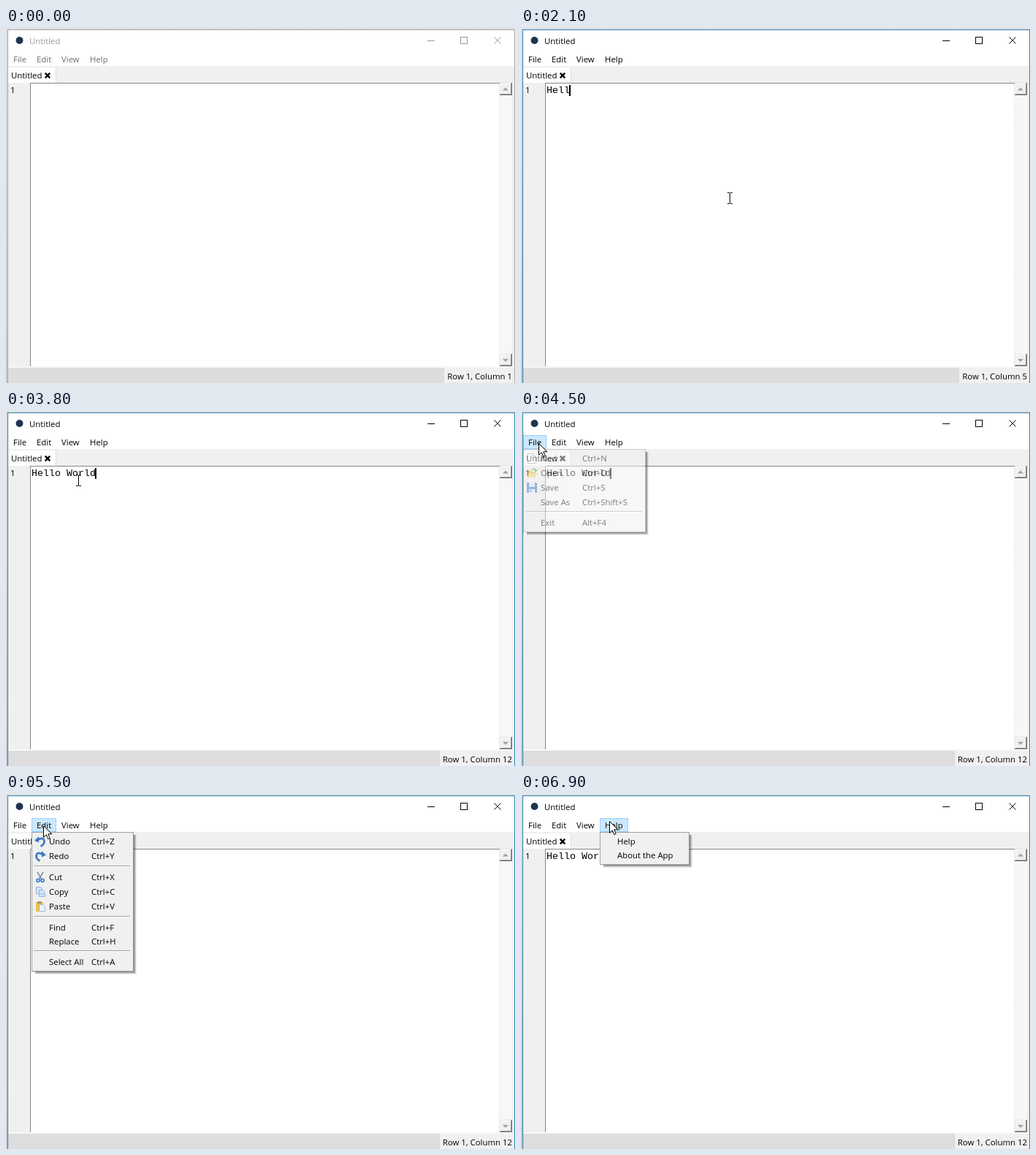
Animation, 698 px wide and 486 px high, one loop 7200 ms. Source, as an HTML page:

```html
<!DOCTYPE html>
<html lang="en">
<head>
<meta charset="utf-8">
<title>Text editor</title>
<style>
  html, body { margin: 0; width: 100%; height: 100%; overflow: hidden; background: #fff; }
  svg { display: block; width: 698px; height: 486px; }
  text { font: 11.4px "Open Sans", "Noto Sans", sans-serif; white-space: pre; }
  .code { font: 13.333px "Liberation Mono", "Courier New", monospace; }
  .crisp { shape-rendering: crispEdges; }
</style>
</head>
<body>
<svg id="stage" viewBox="0 0 698 486" xmlns="http://www.w3.org/2000/svg">
  <defs>
    <pattern id="track" width="2" height="2" patternUnits="userSpaceOnUse">
      <path d="M0 0h2v2h-2z" fill="#fdfdfd"/><path d="M0 0h1v1h-1zM1 1h1v1h-1z" fill="#f1f1f1"/>
    </pattern>
    <linearGradient id="edge" x2="0" y2="1">
      <stop stop-color="#dcdcde"/><stop offset="1" stop-color="#c3c3ca"/>
    </linearGradient>
  </defs>

  <!-- window -->
  <g class="crisp">
    <path d="M0 0h698v486h-698z" fill="url(#edge)"/>
    <path d="M3 3h694v49h-694z" fill="#fff"/>
    <path d="M3 52h694v434h-694z" fill="#f0f0f0"/>
    <path id="frame" d="M2.5 486V2.5H697.5V486" fill="none"/>
    <path d="M3 54h65v21h-65z" fill="#fff"/>
    <path d="M68.5 54V74" stroke="#dcdcdc"/>
    <path d="M33 75h643v388h-643z" fill="#fff"/>
    <path d="M33.5 463V75.5H677" fill="none" stroke="#868686"/>
    <path d="M677 75h17v388h-17z" fill="url(#track)"/>
    <path d="M3 463h694v2h-694z" fill="#f8f8f8"/>
    <path d="M3 465h694v21h-694z" fill="#dddddd"/>
    <path id="statusBox" fill="#f0f0f0"/>
  </g>
  <g id="scroll"></g>

  <circle cx="18.5" cy="17" r="5" fill="#1d3450"/>
  <text id="title" x="32" y="22">Untitled</text>
  <g id="buttons" fill="none">
    <path class="crisp" d="M578 17.5h10M623.5 12.5h9v9h-9z"/>
    <path d="M669.5 12.5l9 9M678.5 12.5l-9 9"/>
  </g>
  <rect id="hover" class="crisp" y="33.5" height="18" fill="#cce8ff" stroke="#99d1ff"/>
  <g id="bar"></g>

  <text x="7" y="69">Untitled</text>
  <path d="M53.7 61.7l6.6 6.6M60.3 61.7l-6.6 6.6" stroke="#000" stroke-width="2.4"/>
  <text x="6" y="89">1</text>
  <text id="typed" class="code" x="35" y="89"></text>
  <rect id="caret" class="crisp" y="78" height="15"/>
  <text id="status" x="694" y="481" text-anchor="end"></text>

  <g id="menus"></g>
  <path id="beam" class="crisp" d="M-3 -7.5h3M1 -7.5h3M.5 -7V7M-3 7.5h3M1 7.5h3" fill="none" stroke="#000"/>
  <path id="arrow" d="M.5 .5V16.3L4.2 12.8L6.8 18.6L9.2 17.5L6.7 11.8H11.8Z" fill="#fff" stroke="#000"/>
</svg>

<script>
const LOOP = 7200, STEP = 100;
const PHRASE = "Hello World";
const KEYS = [1500, 1700, 1900, 2100, 2300, 2500, 2600, 2700, 2900, 3100, 3300];
const FOCUS = 400, MENU_OPEN = 4400;
const CARET_OFF = [[0, FOCUS], [1000, 1300], [4000, 4300]];
const FADE = [0.25, 0.5, 0.75, 0.9];

// time, x, y of the pointer
const PATH = [
  [100, 640, 480], [400, 434, 348], [600, 434, 348], [1000, 286, 233],
  [3400, 286, 233], [3800, 99, 95], [3900, 99, 95], [4300, 24, 44],
  [4900, 24, 44], [5200, 51, 43], [5500, 51, 43], [5700, 86, 42],
  [6100, 86, 42], [6400, 118, 41], [6700, 120, 39], [6900, 121, 37]
];

const ICONS = {
  new: `<path d="M2.5 1.5h7l4 4v9h-11z" fill="#fff" stroke="#8a9bb0"/><path d="M9.5 1.5v4h4" fill="none" stroke="#8a9bb0"/>`,
  open: `<path d="M1 4h5l1 2h6v8H1z" fill="#e2b93f"/><path d="M3 8h12l-2 6H1z" fill="#f8d976"/><path d="M8 4q3-4 5 0" fill="none" stroke="#5ba043" stroke-width="1.6"/><path d="M11 3.5h4.5L13.2 7z" fill="#5ba043"/>`,
  save: `<path d="M1 1h13l1 1v13H1z" fill="#3d7cc9"/><path d="M4 1h8v6H4z" fill="#dbe8f6"/><path d="M4 10h8v5H4z" fill="#eef3f8"/><path d="M5.5 11h2v3h-2z" fill="#3d7cc9"/>`,
  undo: `<path d="M4 6Q13 1 13.5 8Q13.5 12 8.5 14.5" fill="none" stroke="#3f78c3" stroke-width="2.8"/><path d="M0 6.8L6 1V9.5z" fill="#3f78c3"/>`,
  cut: `<path d="M4 1l5.5 9M12 1L6.5 10" stroke="#7d92a8" stroke-width="1.6"/><g fill="none" stroke="#3b82cc" stroke-width="1.7"><circle cx="5" cy="12.3" r="2"/><circle cx="11" cy="12.3" r="2"/></g>`,
  copy: `<g fill="#d5e7f7" stroke="#8fb4d8"><path d="M2.5 1.5h6l2 2v7h-8z"/><path d="M6.5 5.5h5l3 3v6h-8z"/></g><path d="M8 10h5M8 12h5" stroke="#a9c7e4"/>`,
  paste: `<path d="M2 2h10v13H2z" fill="#f0c443"/><path d="M4.5 1h5v3h-5z" fill="#8d8d8d"/><path d="M6.5 5.5h5l3 3v6h-8z" fill="#e9f1fa" stroke="#9db8d4"/>`
};
ICONS.redo = `<g transform="matrix(-1 0 0 1 16 0)">${ICONS.undo}</g>`;

// rows: [baseline, label, shortcut, icon]
const MENUS = [
  { name: "File", tx: 10, bar: [3, 35], box: [3, 170, 165], label: 27, keys: 84, seps: [137], rows: [
    [69, "New", "Ctrl+N", "new"], [89, "Open", "Ctrl+O", "open"], [109, "Save", "Ctrl+S", "save"],
    [129, "Save As", "Ctrl+Shift+S"], [157, "Exit", "Alt+F4"]] },
  { name: "Edit", tx: 42, bar: [35, 69], box: [35, 174, 242], label: 59, keys: 117, seps: [98, 167, 214], rows: [
    [69, "Undo", "Ctrl+Z", "undo"], [89, "Redo", "Ctrl+Y", "redo"], [118, "Cut", "Ctrl+X", "cut"],
    [138, "Copy", "Ctrl+C", "copy"], [158, "Paste", "Ctrl+V", "paste"], [187, "Find", "Ctrl+F"],
    [206, "Replace", "Ctrl+H"], [234, "Select All", "Ctrl+A"]] },
  { name: "View", tx: 76, bar: [69, 108], box: [69, 242, 135], label: 93, seps: [], rows: [
    [69, "Show Line Numbers"], [89, "Show Status Bar"], [109, "Highlight Line"], [129, "Dark Theme"]] },
  { name: "Help", tx: 115, bar: [108, 147], box: [108, 230, 96], label: 132, seps: [], rows: [
    [69, "Help"], [88, "About the App"]] }
];

const $ = id => document.getElementById(id);
const put = (el, attrs) => { for (const k in attrs) el.setAttribute(k, attrs[k]); };
const show = (el, on) => { el.style.display = on ? "" : "none"; };
const label = (x, y, s) => `<text x="${x}" y="${y}">${s}</text>`;

function menuMarkup({ box: [l, r, b], label: lx, keys, seps, rows }) {
  const shadow = [0.45, 0.33, 0.2, 0.08].map((o, i) =>
    `<path d="M${r + i + 1.5} 56V${b + i + 1.5}H${l + 5}" fill="none" stroke="#000" stroke-opacity="${o}"/>`).join("");
  const lines = seps.map(y =>
    `<path class="crisp" d="M${l + 3} ${y}.5H${r - 4}" stroke="#a0a0a0"/><path class="crisp" d="M${l + 3} ${y + 1}.5H${r - 4}" stroke="#fff"/>`).join("");
  const items = rows.map(([y, name, key, icon]) =>
    (icon ? `<g transform="translate(${l + 4} ${y - 12})">${ICONS[icon]}</g>` : "") +
    label(lx, y, name) + (key ? label(keys, y, key) : "")).join("");
  return `<g>${shadow}<g><rect class="crisp" x="${l}.5" y="52.5" width="${r - l}" height="${b - 52}" fill="#f0f0f0" stroke="#a0a0a0"/>${lines}${items}</g></g>`;
}

function scrollButton(y, tri) {
  return `<g class="crisp" fill="none"><path d="M677 ${y}h17v17h-17z" fill="#f0f0f0"/>
    <path d="M677.5 ${y + 16}V${y}.5H693" stroke="#e3e3e3"/><path d="M678.5 ${y + 15}V${y + 1}.5H692" stroke="#fff"/>
    <path d="M693.5 ${y}V${y + 16}.5H677" stroke="#696969"/><path d="M692.5 ${y + 1}V${y + 15}.5H678" stroke="#a0a0a0"/></g>
    <path d="${tri}" fill="#a0a0a0"/>`;
}

$("scroll").innerHTML = scrollButton(75, "M681 85.5h8l-4-4z") + scrollButton(446, "M681 453h8l-4 4z");
$("bar").innerHTML = MENUS.map(m => label(m.tx, 47, m.name)).join("");
$("menus").innerHTML = MENUS.map(menuMarkup).join("");
const panels = [...$("menus").children];

function pointer(t) {
  const i = PATH.findIndex(p => p[0] > t);
  if (i < 0) return PATH[PATH.length - 1].slice(1);
  if (i === 0) return null;
  const [t0, x0, y0] = PATH[i - 1], [t1, x1, y1] = PATH[i];
  const k = (t - t0) / (t1 - t0);
  return [Math.round(x0 + (x1 - x0) * k), Math.round(y0 + (y1 - y0) * k)];
}

function drawPointer(pos) {
  const inText = pos && pos[0] > 34 && pos[0] < 676 && pos[1] > 76 && pos[1] < 463;
  show($("beam"), inText);
  show($("arrow"), pos && !inText);
  if (pos) put($(inText ? "beam" : "arrow"), { transform: `translate(${pos})` });
}

function drawMenus(t, pos) {
  const over = pos && pos[1] > 32 && pos[1] < 53
    ? MENUS.findIndex(m => pos[0] >= m.bar[0] && pos[0] < m.bar[1]) : -1;
  show($("hover"), over >= 0);
  if (over >= 0) {
    const [l, r] = MENUS[over].bar;
    put($("hover"), { x: l + 0.5, width: r - l - 1 });
  }
  panels.forEach((p, i) => show(p, i === over && t >= MENU_OPEN));
  put(panels[0].lastElementChild, { opacity: FADE[(t - MENU_OPEN) / STEP] ?? 1 });
}

function draw(t) {
  const active = t >= FOCUS;
  put($("frame"), { stroke: active ? "#2c80b4" : "#a9a9ab" });
  put($("title"), { fill: active ? "#000" : "#999" });
  put($("bar"), { fill: active ? "#000" : "#6d6d6d" });
  put($("buttons"), { stroke: active ? "#000" : "#999" });

  const n = KEYS.filter(k => k <= t).length;
  $("typed").textContent = PHRASE.slice(0, n);
  $("status").textContent = `Row 1, Column ${n + 1}`;
  put($("statusBox"), { d: `M${n > 8 ? 595 : 601} 465H697V486H${n > 8 ? 595 : 601}z` });
  put($("caret"), n ? { x: 34 + 8 * n, width: 2 } : { x: 35, width: 1 });
  show($("caret"), !CARET_OFF.some(([a, b]) => t >= a && t < b));

  const pos = pointer(t);
  drawMenus(t, pos);
  drawPointer(pos);
}

function tick() {
  draw(Math.floor(performance.now() % LOOP / STEP) * STEP);
  requestAnimationFrame(tick);
}
tick();
</script>
</body>
</html>
```
